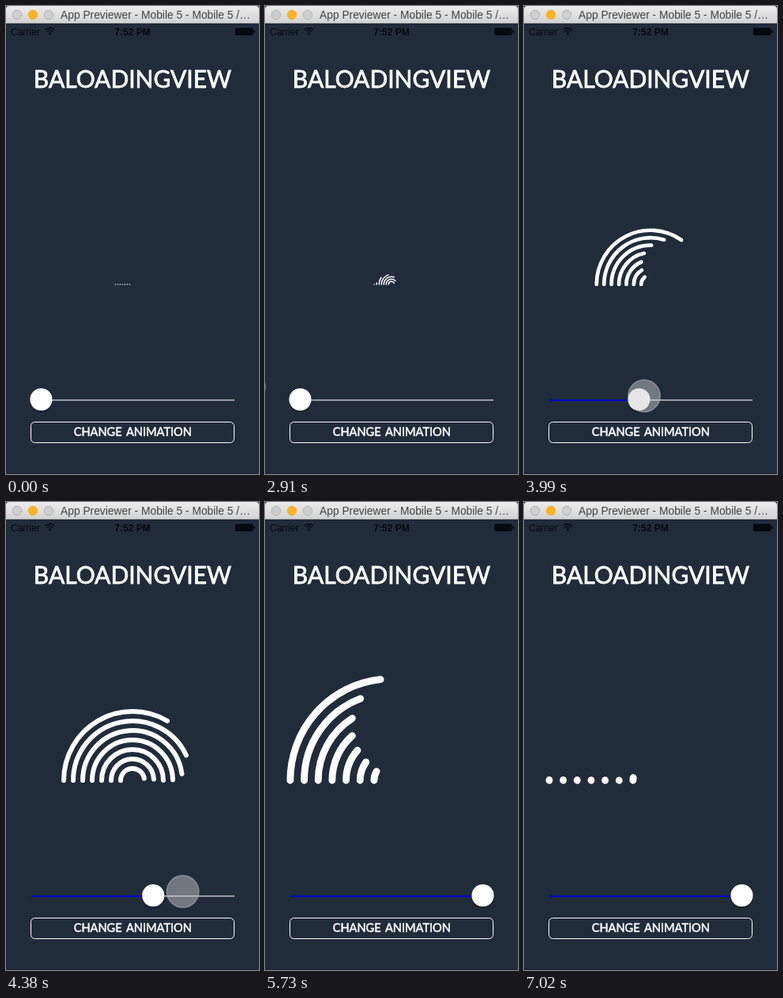
An HTML page that plays this animation: 320 px wide and 590 px high, repeating every 7050 ms.

```html
<!DOCTYPE html>
<html lang="en">
<head>
<meta charset="utf-8">
<title>Loading view</title>
<style>
  html, body { margin: 0; width: 100%; height: 100%; overflow: hidden; background: #212c3b; }
  svg { display: block; width: 320px; height: 590px; }
  .ui { font-family: "Liberation Sans", Arial, sans-serif; }
  .caps { font-family: Lato, sans-serif; fill: #fff; stroke: #fff; text-anchor: middle; }
</style>
</head>
<body>
<svg viewBox="0 0 320 590">
  <defs>
    <linearGradient id="bar" x2="0" y2="1">
      <stop offset="0" stop-color="#ececec"/>
      <stop offset="1" stop-color="#d2d2d2"/>
    </linearGradient>
    <filter id="shadow" x="-30%" y="-30%" width="160%" height="170%">
      <feDropShadow dx="0" dy="2" stdDeviation="1.5" flood-color="#000" flood-opacity=".35"/>
    </filter>
  </defs>

  <rect width="320" height="590" fill="#212c3b"/>
  <rect y="589" width="320" height="1" fill="#1b222b"/>

  <!-- window bar -->
  <rect width="320" height="22" fill="#1a2029"/>
  <path d="M0 22V4a4 4 0 0 1 4-4H316a4 4 0 0 1 4 4V22Z" fill="url(#bar)"/>
  <rect y="21" width="320" height="1" fill="#b4b4b4"/>
  <g stroke-width="1">
    <circle cx="14" cy="11" r="5.7" fill="#cfcfcf" stroke="#b2b2b2"/>
    <circle cx="34" cy="11" r="5.7" fill="#fdb324" stroke="#f5ae2c"/>
    <circle cx="54" cy="11" r="5.7" fill="#cfcfcf" stroke="#b2b2b2"/>
  </g>
  <text class="ui" x="69" y="16" font-size="13.8" fill="#444">App Previewer - Mobile 5 - Mobile 5 /…</text>

  <!-- status bar -->
  <g class="ui" font-size="12" fill="#06090d">
    <text x="6" y="37">Carrier</text>
    <text x="160" y="37" font-weight="700" text-anchor="middle">7:52 PM</text>
    <path d="M55.5 36.5L53.6 34.3A3 3 0 0 1 57.4 34.3Z"/>
    <path d="M51.8 32.3A5.3 5.3 0 0 1 59.2 32.3M49.8 30A8.2 8.2 0 0 1 61.2 30" fill="none" stroke="#06090d" stroke-width="1.6"/>
    <rect x="290" y="27.5" width="22.5" height="9.5" rx="2"/>
    <rect x="313" y="30.5" width="1.8" height="3.5" rx=".8"/>
  </g>

  <text class="caps" x="160" y="102.8" font-size="30" stroke-width=".8">BALOADINGVIEW</text>

  <g id="arcs" fill="none" stroke="#fff" stroke-linecap="round"></g>

  <!-- slider -->
  <rect id="rest" y="496" height="1.6" fill="#b6b7b9"/>
  <rect id="fill" x="32" y="496" height="2" fill="#0000d2"/>
  <circle id="thumb" cy="496" r="14" fill="#fff" filter="url(#shadow)"/>

  <rect x="31.5" y="524.5" width="257" height="26" rx="5" fill="none" stroke="#fff"/>
  <text class="caps" x="160.3" y="542" font-size="14.6" stroke-width=".5" word-spacing="2">CHANGE ANIMATION</text>

  <circle id="touch" r="20.3" fill="#cacaca" fill-opacity=".48" stroke="#c8cccf" stroke-opacity=".45" stroke-width="1.4"/>
</svg>

<script>
const LOOP = 7050, STEP = 30;
const CYCLE = 1808, CYCLE_START = 67;
const COUNT = 7, FASTEST = 498;
const CX = 160, CY = 351;
const TRACK_START = 32, TRACK_END = 289;
const THUMB_MIN = 44.5, THUMB_MAX = 275.5;

// [time, x]
const thumbPath = [[3660, 44.5], [3800, 75], [3990, 145.5], [4320, 161], [4420, 203], [4650, 256.5], [4790, 275.5]];
// [time, x, y]
const touchPath = [
  [2880, -23, 479], [2910, -20, 480], [3200, 8, 491], [3500, 44, 500], [3660, 51, 500],
  [3800, 82, 495], [3990, 152, 491.5], [4220, 168, 491], [4320, 208, 491],
  [4650, 294, 491], [4850, 318, 493], [5150, 326, 493], [5340, 346, 492]
];

const byId = id => document.getElementById(id);
const [group, rest, fill, thumb, touch] = ["arcs", "rest", "fill", "thumb", "touch"].map(byId);
const arcs = Array.from({ length: COUNT }, () =>
  group.appendChild(document.createElementNS("http://www.w3.org/2000/svg", "path")));

function along(path, t, k) {
  if (t <= path[0][0]) return path[0][k];
  const i = path.findIndex(p => p[0] > t);
  if (i < 0) return path[path.length - 1][k];
  const a = path[i - 1], b = path[i];
  return a[k] + (b[k] - a[k]) * (t - a[0]) / (b[0] - a[0]);
}

// cubic-bezier(.42, 0, .58, 1)
function easeInOut(x) {
  let lo = 0, hi = 1;
  for (let n = 0; n < 24; n++) {
    const s = (lo + hi) / 2, r = 1 - s;
    if (1.26 * r * r * s + 1.74 * r * s * s + s * s * s < x) lo = s; else hi = s;
  }
  return lo * lo * (3 - 2 * lo);
}

// Each arc sweeps out and back; inner arcs take longer.
function drawArcs(t, size) {
  const tau = (t - CYCLE_START + CYCLE) % CYCLE;
  const width = size / 15;
  group.setAttribute("stroke-width", width);
  arcs.forEach((arc, i) => {
    const r = width * (14.5 - 2 * i);
    const p = Math.min(2, tau / (FASTEST * (1 + i / 9)));
    const angle = Math.max(0.005, Math.PI * easeInOut(p < 1 ? p : 2 - p));
    const x = CX - r * Math.cos(angle), y = CY - r * Math.sin(angle);
    arc.setAttribute("d", `M${CX - r} ${CY}A${r} ${r} 0 0 1 ${x} ${y}`);
  });
}

function draw(t) {
  const x = along(thumbPath, t, 1);
  const value = (x - THUMB_MIN) / (THUMB_MAX - THUMB_MIN);
  drawArcs(t, 22.5 + 110 * value);
  thumb.setAttribute("cx", x);
  fill.setAttribute("width", x - TRACK_START);
  rest.setAttribute("x", x);
  rest.setAttribute("width", TRACK_END - x);
  touch.setAttribute("cx", along(touchPath, t, 1));
  touch.setAttribute("cy", along(touchPath, t, 2));
}

const start = performance.now();
function tick() {
  const t = (performance.now() - start) % LOOP;
  draw(Math.floor(t / STEP) * STEP);
  requestAnimationFrame(tick);
}
tick();
</script>
</body>
</html>
```
